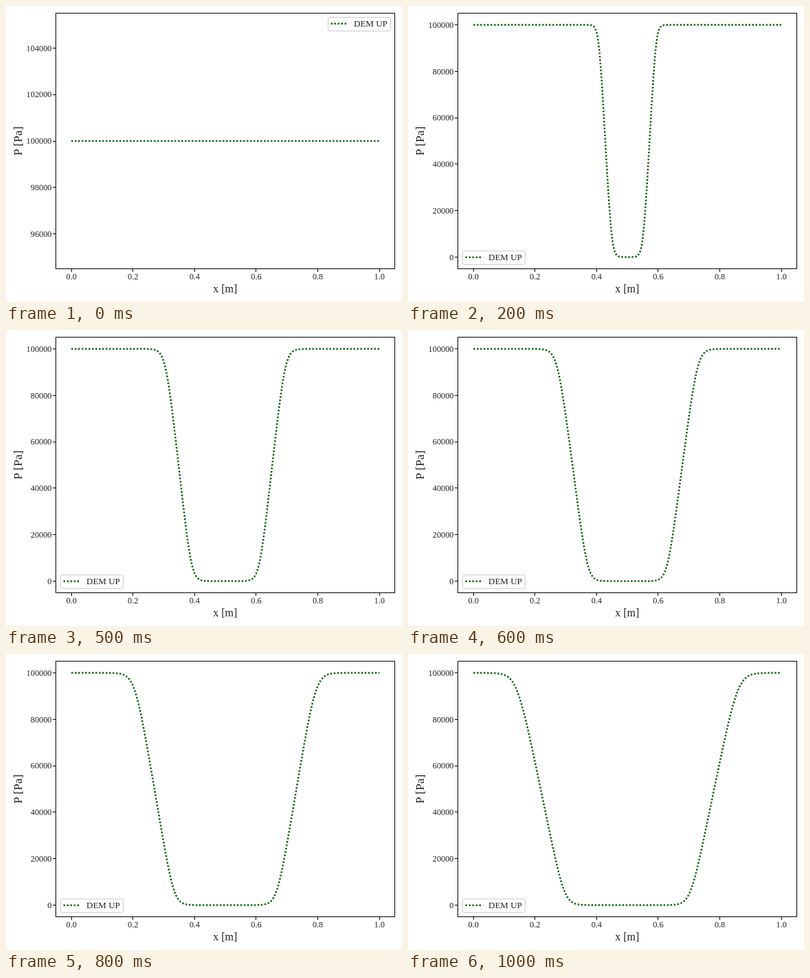
Animation, 576 px wide and 432 px high, one loop 1.1 s. Source, as an HTML page:

```html
<!DOCTYPE html>
<html lang="en">
<head>
<meta charset="utf-8">
<title>Pressure profile</title>
<style>
  html, body { margin: 0; width: 100%; height: 100%; overflow: hidden; background: #fff; }
  svg { display: block; width: 576px; height: 432px; }
  text { font-family: "Liberation Serif", "Times New Roman", serif; font-size: 12.3px; fill: #222; }
  .axis { fill: none; stroke: #000; stroke-width: 1; }
  .curve { fill: none; stroke: #006400; stroke-width: 2.5; stroke-dasharray: 2.4 2.6; stroke-linejoin: round; }
  .mid { text-anchor: middle; }
  .end { text-anchor: end; }
</style>
</head>
<body>
<svg viewBox="0 0 576 432">
  <g id="axes"></g>
  <path id="profile" class="curve"/>
  <rect class="axis" x="72.5" y="10.5" width="493" height="373"/>
  <text class="mid" x="318.7" y="417.5" style="font-size:16px">x [m]</text>
  <text class="mid" transform="translate(23.3 197) rotate(-90)" style="font-size:17.4px">P [Pa]</text>
  <g id="legend">
    <rect x=".5" y=".5" width="91" height="20" rx="2.5" fill="#fff" fill-opacity=".8" stroke="#ccc"/>
    <path class="curve" d="M4.6 9.7h25"/>
    <text x="38" y="14" style="font-size:13px">DEM UP</text>
  </g>
</svg>
<script>
const STEP = 100, STEPS = 11, SAMPLES = 500;
const LEFT = 95.1, WIDTH = 448.1, BASE = 366.5, HEIGHT = 339, TICK = 67.8;
const axes = document.getElementById("axes");
const profile = document.getElementById("profile");
const legend = document.getElementById("legend");

function add(tag, attrs, text = "") {
  const el = document.createElementNS("http://www.w3.org/2000/svg", tag);
  for (const name in attrs) el.setAttribute(name, attrs[name]);
  el.textContent = text;
  axes.append(el);
}

const snap = v => Math.floor(v) + 0.5;
const softplus = z => z > 30 ? z : Math.log1p(Math.exp(z));

// Relative pressure at distance d from the centre: a widening ramp with rounded ends.
function pressure(d, k) {
  const centre = 0.0175 + 0.0274 * k - 0.0001 * k * k;
  const ramp = 0.013 + 0.0142 * k;
  const tail = 0.0042 * Math.sqrt(k), head = 0.0035 * k ** 0.68;
  const rise = tail * softplus((d - centre + ramp / 2) / tail);
  const cap = head * softplus((d - centre - ramp / 2) / head);
  return (rise - cap) / ramp;
}

function curve(k) {
  if (k === 0) return `M${LEFT} 197h${WIDTH}`;
  const points = [];
  for (let i = 0; i <= SAMPLES; i++) {
    const x = i / SAMPLES;
    const y = BASE - HEIGHT * pressure(Math.abs(x - 0.5), k);
    points.push((LEFT + WIDTH * x).toFixed(2) + " " + y.toFixed(2));
  }
  return "M" + points.join("L");
}

function drawAxes(first, count, step, bottom) {
  axes.textContent = "";
  for (let i = 0; i <= 5; i++) {
    const x = LEFT + WIDTH * i / 5;
    add("path", { class: "axis", d: `M${snap(x)} 384v4` });
    add("text", { class: "mid", x, y: 399 }, (i / 5).toFixed(1));
  }
  for (let i = 0; i < count; i++) {
    const y = bottom - i * TICK;
    add("path", { class: "axis", d: `M68 ${snap(y)}h4` });
    add("text", { class: "end", x: 66.5, y: y + 4.2 }, first + i * step);
  }
}

let shown = -1;
function draw(now) {
  const k = Math.floor(now / STEP) % STEPS;
  if (k !== shown) {
    shown = k;
    if (k === 0) drawAxes(96000, 5, 2000, 332.6);
    else drawAxes(0, 6, 20000, BASE);
    legend.setAttribute("transform", k === 0 ? "translate(468 16)" : "translate(79 357)");
    profile.setAttribute("d", curve(k));
  }
}

const start = performance.now();
function tick() {
  draw(performance.now() - start);
  requestAnimationFrame(tick);
}
tick();
</script>
</body>
</html>
```
